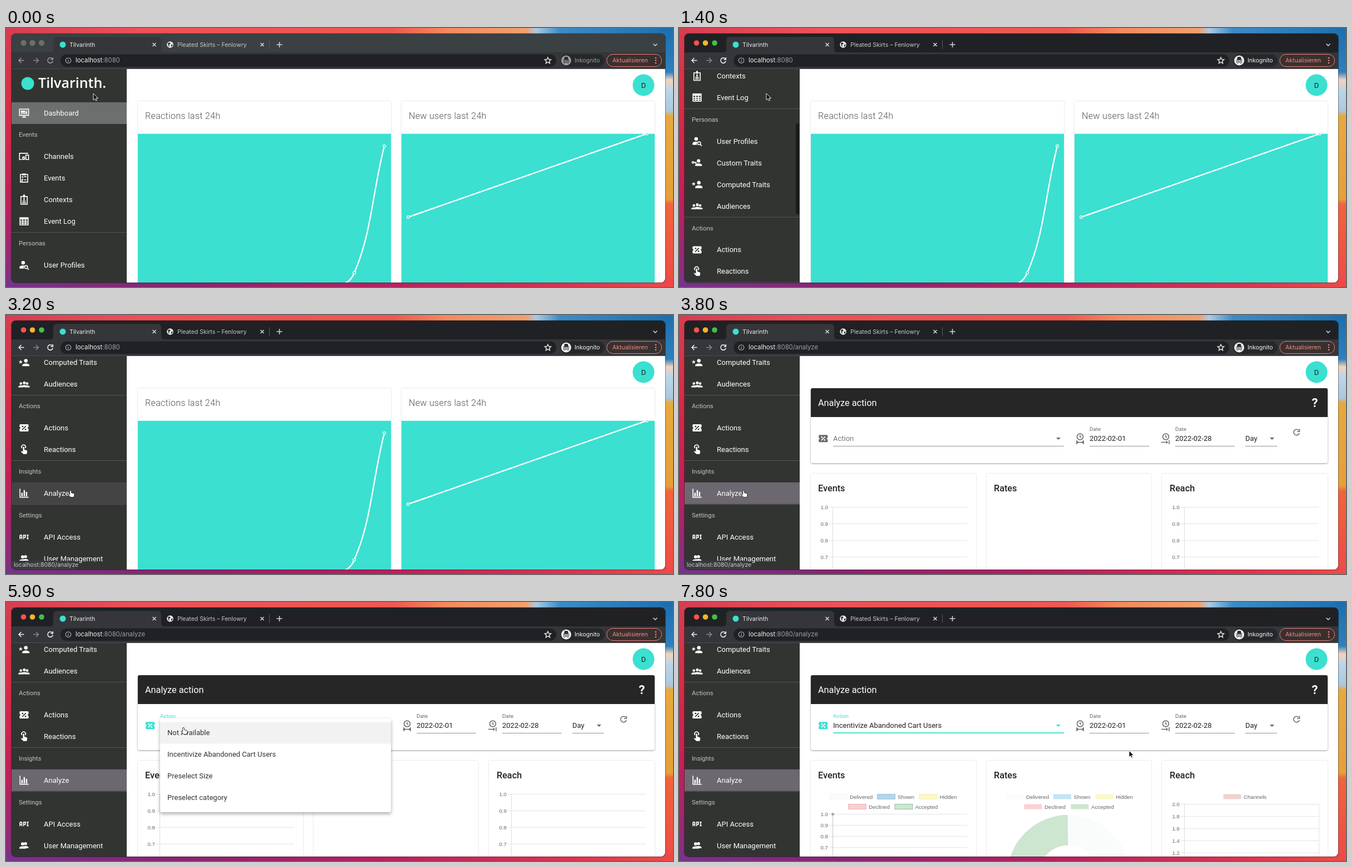
An HTML page that plays this animation: 1199x467 px, repeating every 8000 ms.

```html
<!DOCTYPE html>
<html lang="en">
<head>
<meta charset="utf-8">
<title>Dashboard walkthrough</title>
<style>
@property --scroll { syntax: "<number>"; inherits: true; initial-value: 0; }
@property --grow { syntax: "<number>"; inherits: true; initial-value: 0; }

html, body { margin: 0; width: 100%; height: 100%; overflow: hidden; }
svg { display: block; width: 100%; height: 100%; }
text { font: 13px Roboto, sans-serif; white-space: pre; }
.ui text { font: 10.5px Inter, sans-serif; }
.ui .url { font-size: 11.3px; }
.sub { font-size: 11.4px; fill: #c3c4c3; }
.head { font-size: 16.25px; }
.light { font-weight: 300; letter-spacing: .2px; fill: #555; }
.strong { font-weight: 500; fill: #222; }
.small { font-size: 9.75px; fill: #666; }
.chart text { font: 9.75px "Liberation Sans", Arial, sans-serif; fill: #666; }
.end { text-anchor: end; }
.mid { text-anchor: middle; }
.card { fill: #fff; filter: drop-shadow(0 .8px 1px #0003); }
.line { fill: none; stroke: currentColor; stroke-width: 1.5; }

/* every part shares one 8 s clock; 1% is 80 ms */
.t { animation: 8s linear infinite; }
.step { animation-timing-function: step-end; }

.bar { animation-name: bar; }
@keyframes bar { 0%, 1.25% { fill: #3b4042 } 2.5%, 100% { fill: #202124 } }
.ink { animation-name: ink; }
@keyframes ink { 0%, 1.25% { color: #9b9d9e } 2.5%, 100% { color: #f4f4f4 } }
.idle { animation-name: idle; }
@keyframes idle { 0%, 1.25% { opacity: 1 } 2.5%, 100% { opacity: 0 } }

.side { animation-name: scroll; }
@keyframes scroll {
  0%, 12.1% { --scroll: 0 } 13.75% { --scroll: 95 } 15% { --scroll: 150 }
  16.25% { --scroll: 192 } 17.5% { --scroll: 223 } 19% { --scroll: 243 }
  21.25%, 22.4% { --scroll: 252 } 23.75% { --scroll: 290 } 25% { --scroll: 338 }
  26.25% { --scroll: 380 } 27.5% { --scroll: 404 } 28.75% { --scroll: 416 }
  31%, 100% { --scroll: 419.6 }
}
#list { transform: translateY(calc(var(--scroll) * -1px)); }
.thumb { transform: translateY(calc(var(--scroll) * .43px)); animation-name: thumb; }
@keyframes thumb { 0%, 12% { opacity: 0 } 13%, 33.75% { opacity: 1 } 37%, 100% { opacity: 0 } }
.active { animation-name: active; }
@keyframes active { 0%, 37.5% { fill: #6d677000 } 39%, 43% { fill: #6d677050 } 45%, 100% { fill: #6d6770 } }
.status { animation-name: status; }
@keyframes status { 0%, 39% { opacity: 0 } 40%, 53.75% { opacity: 1 } 55.5%, 100% { opacity: 0 } }

.before { animation-name: before; }
@keyframes before { 0% { visibility: visible } 43.75%, 100% { visibility: hidden } }
.after { animation-name: after; }
@keyframes after { 0% { visibility: hidden } 43.75%, 100% { visibility: visible } }

.label { transform: translate(277px, 227px); animation-name: label; }
@keyframes label {
  0%, 63.25% { transform: translate(277px, 227px); fill: #757575; animation-timing-function: cubic-bezier(.25, .8, .5, 1) }
  67%, 100% { transform: translate(277px, 209.3px) scale(.75); fill: #3be0d0 }
}
.tint { animation-name: tint; }
@keyframes tint { 0%, 63.5% { color: #6a6a6a } 67%, 100% { color: #3be0d0 } }
.focus { transform-origin: 484.5px 236px; animation-name: focus; }
@keyframes focus {
  0%, 63.25% { transform: scaleX(0); fill: #111; animation-timing-function: cubic-bezier(.25, .8, .5, 1) }
  67%, 100% { transform: scaleX(1); fill: #3be0d0 }
}
.caret { transform-origin: 682px 223px; animation-name: caret; }
@keyframes caret {
  0%, 63.25% { transform: none; animation-timing-function: ease-out }
  67%, 83% { transform: rotate(180deg) } 86.5%, 100% { transform: rotate(0deg) }
}
.hoverline { animation-name: hoverline; }
@keyframes hoverline { 0%, 59% { fill: #949494 } 61%, 83% { fill: #222 } 87%, 100% { fill: #949494 } }
.value { animation-name: value; }
@keyframes value { 0%, 83% { opacity: 0 } 83.01%, 100% { opacity: 1 } }

.menu { animation-name: menu; animation-timing-function: cubic-bezier(.25, .8, .25, 1); }
@keyframes menu { 0%, 64.2% { opacity: 0 } 68%, 83.25% { opacity: 1 } 87%, 100% { opacity: 0 } }
.row1 { animation-name: row1; }
@keyframes row1 { 0%, 75.5% { opacity: 1 } 77%, 100% { opacity: 0 } }
.row2 { animation-name: row2; }
@keyframes row2 { 0%, 75.5% { opacity: 0 } 77%, 100% { opacity: 1 } }
.ripple { transform-origin: 355px 270px; animation-name: ripple; }
@keyframes ripple { 0%, 82% { transform: scale(0); opacity: 1 } 83.75% { transform: scale(1); opacity: 1 } 87%, 100% { transform: scale(1.3); opacity: 0 } }
.pick { animation-name: pick; }
@keyframes pick { 0%, 82.5% { fill: #333 } 83.5%, 100% { fill: #3be0d0 } }

.empty { animation-name: empty; }
@keyframes empty { 0% { visibility: hidden } 43.75% { visibility: visible } 86.25%, 100% { visibility: hidden } }
.filled { animation-name: filled; }
@keyframes filled { 0% { visibility: hidden } 86.25%, 100% { visibility: visible } }
.grow { animation-name: grow; }
@keyframes grow { 0%, 86.25% { --grow: 0; animation-timing-function: cubic-bezier(.165, .84, .44, 1) } 98.75%, 100% { --grow: 1 } }
.arc {
  fill: none; stroke-width: 55; transform-origin: 700px 493.5px; transform: rotate(-90deg);
  stroke-dasharray: calc(var(--grow) * 180px) 400px;
}
.second { transform: rotate(calc(var(--grow) * 180deg - 90deg)); }
.dot { transform: translateY(calc(203px - var(--grow) * 203px)); }

.cursor { animation-name: cursor; animation-timing-function: ease-in-out; }
@keyframes cursor {
  0%, 33.75% { transform: translate(157px, 118px) } 40%, 53.75% { transform: translate(116px, 316px) }
  61.25%, 73.75% { transform: translate(319px, 226px) } 80%, 85% { transform: translate(355px, 266px) }
  93.75%, 100% { transform: translate(809px, 268px) }
}
.arrow { animation-name: arrow; }
@keyframes arrow { 0% { opacity: 1 } 36% { opacity: 0 } 55.5% { opacity: 1 } 59% { opacity: 0 } 83% { opacity: 1 } 100% { opacity: 1 } }
.hand { animation-name: hand; }
@keyframes hand { 0% { opacity: 0 } 36% { opacity: 1 } 55.5% { opacity: 0 } 59% { opacity: 1 } 83% { opacity: 0 } 100% { opacity: 0 } }
</style>
</head>
<body>
<svg viewBox="0 0 1199 467">
<defs>
  <linearGradient id="sky">
    <stop offset="0" stop-color="#d63d50"/><stop offset=".2" stop-color="#ee5057"/>
    <stop offset=".58" stop-color="#f0584f"/><stop offset=".66" stop-color="#f48a5c"/>
    <stop offset=".78" stop-color="#f0a070"/><stop offset=".795" stop-color="#a9cbe4"/>
    <stop offset=".83" stop-color="#3d8cc6"/><stop offset="1" stop-color="#1c6fae"/>
  </linearGradient>
  <linearGradient id="west" x2="0" y2="1">
    <stop offset="0" stop-color="#d63d50"/><stop offset=".3" stop-color="#d92b45"/>
    <stop offset=".65" stop-color="#c21f58"/><stop offset="1" stop-color="#7b3285"/>
  </linearGradient>
  <linearGradient id="ground">
    <stop offset="0" stop-color="#78338a"/><stop offset=".25" stop-color="#8a2370"/>
    <stop offset=".55" stop-color="#b52060"/><stop offset=".85" stop-color="#e0324f"/><stop offset="1" stop-color="#ee4a48"/>
  </linearGradient>
  <linearGradient id="east" x2="0" y2="1">
    <stop offset="0" stop-color="#1c6fae"/><stop offset=".17" stop-color="#2f80bd"/>
    <stop offset=".2" stop-color="#f3d2bd"/><stop offset=".24" stop-color="#bcd6e8"/><stop offset=".32" stop-color="#a9c8e0"/>
    <stop offset=".34" stop-color="#e7a93f"/><stop offset=".66" stop-color="#e5a038"/>
    <stop offset=".68" stop-color="#f2643c"/><stop offset="1" stop-color="#ee4a48"/>
  </linearGradient>
  <clipPath id="win"><rect x="10" y="10" width="1175" height="449" rx="8"/></clipPath>
  <clipPath id="nav"><rect x="10" y="74" width="207" height="385"/></clipPath>
  <clipPath id="plots"><path d="M237 190.5H692V459H237ZM711 190.5H1166V459H711Z"/></clipPath>
  <clipPath id="option"><rect x="278" y="255.5" width="414" height="39"/></clipPath>
  <path id="person" d="M12 4a4 4 0 1 1 0 8 4 4 0 0 1 0-8M12 14c4.4 0 8 1.8 8 4v2H4v-2c0-2.2 3.6-4 8-4Z"/>
  <path id="ticket" fill-rule="evenodd" d="M4 4H20a2 2 0 0 1 2 2V10a2 2 0 0 0 0 4V18a2 2 0 0 1-2 2H4a2 2 0 0 1-2-2V14a2 2 0 0 0 0-4V6a2 2 0 0 1 2-2M15.5 7L7 15.500 8.500 17 17 8.500ZM8.800 7A1.800 1.800 0 1 0 8.810 7ZM15.200 13.400A1.800 1.800 0 1 0 15.210 13.400Z"/>
  <g id="clock" class="line"><circle cx="0" cy="-3" r="5.500"/><path d="M0-6V-3L2-1.500"/></g>
</defs>

<rect width="1199" height="467" fill="url(#sky)"/>
<rect y="10" width="600" height="457" fill="url(#west)"/>
<rect x="1180" width="19" height="467" fill="url(#east)"/>
<rect y="455" width="1199" height="12" fill="url(#ground)"/>
<rect x="9" y="9.500" width="1177" height="450.500" rx="8.500" fill="#0006"/>

<g clip-path="url(#win)">
  <g class="ui">
    <rect class="t bar" x="10" y="10" width="1175" height="40"/>
    <path d="M79 44Q85 44 85 38V23Q85 16 92 16H272Q279 16 279 23V38Q279 44 285 44H1185V74H10V44Z" fill="#35363a"/>
    <g><circle cx="31.500" cy="27" r="4.800" fill="#f9524a"/><circle cx="47.500" cy="27" r="4.800" fill="#f5b52e"/><circle cx="64" cy="27" r="4.800" fill="#3fc246"/></g>
    <g class="t idle" fill="#6c6e6f"><circle cx="31.500" cy="27" r="5"/><circle cx="47.500" cy="27" r="5"/><circle cx="64" cy="27" r="5"/></g>
    <circle cx="102" cy="30" r="5.500" fill="#3be0d0"/>
    <text x="114" y="33.800" fill="#eee">Tilvarinth</text>
    <text x="308" y="33.800" fill="#c6c8ca">Pleated Skirts – Fenlowry</text>
    <circle cx="295" cy="30" r="5.800" fill="#f1f1f1"/>
    <path d="M291 27L294 26 296 28 293 30.500 294 33.500 292 33ZM297 30L300 29.500 298.500 33 296.500 34Z" fill="#333"/>
    <g class="line" color="#d5d6d8" stroke-width="1.300"><path d="M263.500 27l6 6m0-6l-6 6M457.500 27l6 6m0-6l-6 6M486.500 30h10m-5-5v10M1163.500 28.500l3.500 3.500 3.500-3.500"/><path d="M473.500 22V38" stroke="#5a5c60" stroke-width="1"/></g>
    <rect x="98" y="47.500" width="891" height="22.500" rx="11.200" fill="#202124"/>
    <rect x="997" y="47.500" width="79" height="22.500" rx="11.200" fill="#26272a"/>
    <g class="t ink">
      <path class="line" d="M32.500 58.500H23m4.500-4.500L23 58.500l4.500 4.500M83.200 55.500A4.700 4.700 0 1 0 84.200 59.500M84.300 53v3.700H80.500"/>
      <circle cx="1007" cy="58.500" r="9" fill="currentColor"/>
      <path d="M1001 58h12M1003.500 57l1-4.500h5l1 4.500Z" stroke="#2b2c2f" fill="#2b2c2f"/>
      <g fill="none" stroke="#2b2c2f"><circle cx="1004" cy="61.500" r="1.800"/><circle cx="1010" cy="61.500" r="1.800"/><path d="M1006 61h2"/></g>
      <text x="1022" y="62.300" fill="currentColor">Inkognito</text>
    </g>
    <path class="line" color="#85878a" d="M49 58.500H58.500M54 54l4.500 4.500L54 63"/>
    <g class="line" color="#b5b8bb"><circle cx="112" cy="58.500" r="4.800" stroke-width="1.100"/><path d="M112 57.700V61.300M112 55.500V56.600" stroke-width="1.200"/></g>
    <text class="url" x="125" y="62.300" fill="#f1f1f1">localhost<tspan fill="#9aa0a6">:8080</tspan><tspan class="t step after" fill="#9aa0a6">/analyze</tspan></text>
    <path class="line" color="#e0e0e0" stroke-width="1.200" d="M974 53l1.600 3.600 4 .4-3 2.700.9 3.900-3.500-2.100-3.500 2.100.9-3.900-3-2.700 4-.4Z"/>
    <rect x="1080" y="47.500" width="98.500" height="22" rx="11" fill="#38302f" stroke="#ef8178"/>
    <text x="1090" y="62.300" fill="#f28b82">Aktualisieren</text>
    <g fill="#f28b82"><circle cx="1168" cy="54" r="1.300"/><circle cx="1168" cy="58.500" r="1.300"/><circle cx="1168" cy="63" r="1.300"/></g>
  </g>

  <rect x="217" y="74" width="968" height="385" fill="#fff"/>
  <rect x="10" y="73" width="1175" height="1" fill="#4a4c4e"/>

  <g class="t side" clip-path="url(#nav)">
    <rect x="10" y="74" width="207" height="385" fill="#323432"/>
    <g id="list" fill="#fff" color="#fff"></g>
    <rect class="t thumb" x="210" y="76" width="6" height="164" rx="3" fill="#191a19"/>
    <g class="t status ui">
      <path d="M10 443H121Q125 443 125 447V459H10Z" fill="#3a3b3e"/>
      <text x="14" y="454" fill="#c9cacc">localhost:8080/analyze</text>
    </g>
  </g>

  <circle cx="1146" cy="103" r="19.500" fill="#3be0d0"/>
  <text class="mid" x="1146" y="107.600" fill="#222">D</text>

  <g class="t step before">
    <rect class="card" x="237" y="132" width="455" height="340" rx="3"/>
    <rect class="card" x="711" y="132" width="455" height="340" rx="3"/>
    <text class="head light" x="250" y="164">Reactions last 24h</text>
    <text class="head light" x="724" y="164">New users last 24h</text>
    <g clip-path="url(#plots)">
      <rect x="237" y="190.500" width="929" height="270" fill="#3be0d0"/>
      <rect x="692" y="190" width="19" height="270" fill="#fff"/>
      <g fill="none" stroke="#fff" stroke-width="2.400">
        <path d="M604 462C617 459 623 449 626 441.500C657 371 658 300 680 213M723 341L1152 190.500"/>
        <g fill="#3be0d0" stroke-width="1.200"><circle cx="626" cy="441.500" r="2.400"/><circle cx="680" cy="213" r="2.400"/><circle cx="723" cy="341" r="2.400"/><circle cx="1152" cy="190.500" r="2.400"/></g>
      </g>
    </g>
  </g>

  <g class="t step after">
    <rect class="card" x="237" y="132" width="929" height="135" rx="3" style="filter:drop-shadow(0 1px 1.500px #0006)"/>
    <path d="M237 184V135Q237 132 240 132H1163Q1166 132 1166 135V184Z" fill="#262626"/>
    <text class="head" x="250" y="164" fill="#fff">Analyze action</text>
    <text class="mid" x="1143" y="166" fill="#fff" style="font-size:22px;font-weight:700">?</text>
    <rect class="card" x="237" y="286" width="297" height="190" rx="3"/>
    <rect class="card" x="553" y="286" width="296" height="190" rx="3"/>
    <rect class="card" x="868" y="286" width="298" height="190" rx="3"/>
    <text class="head strong" x="250" y="318">Events</text>
    <text class="head strong" x="566" y="318">Rates</text>
    <text class="head strong" x="882" y="318">Reach</text>

    <g class="t tint" fill="currentColor"><use href="#ticket" transform="translate(249.500 213) scale(.8125)"/></g>
    <rect class="t hoverline" x="277" y="236" width="415" height="1"/>
    <rect class="t focus" x="277" y="235.200" width="415" height="1.800"/>
    <text class="t label">Action</text>
    <text class="t value" x="277" y="227.300" fill="#222">Incentivize Abandoned Cart Users</text>
    <g class="t tint"><path class="t caret" d="M678 221h8l-4 4Z" fill="currentColor"/></g>

    <g color="#666">
      <use href="#clock" x="721" y="222.500"/><path class="line" d="M715 226v7m0-3.500h12m0-3.500v7M717 228l-1.500 1.500 1.500 1.500M725 228l1.500 1.500-1.500 1.500"/>
      <use href="#clock" x="875" y="222.500"/><path class="line" d="M867 229.500h11m-2-2l2 2-2 2M881 226v7"/>
      <path class="line" d="M1114 207.800A5.300 5.300 0 1 0 1115.200 213M1115.500 205.500v4.500H1111"/>
      <path d="M1062 221h8l-4 4Z" fill="currentColor"/>
    </g>
    <g fill="#949494"><rect x="738" y="236" width="107" height="1"/><rect x="892" y="236" width="107" height="1"/><rect x="1018" y="236" width="57" height="1"/></g>
    <text class="small" x="738" y="209.300">Date</text><text class="small" x="892" y="209.300">Date</text>
    <g fill="#222"><text x="738" y="227.300">2022-02-01</text><text x="892" y="227.300">2022-02-28</text><text x="1018" y="227.300">Day</text></g>

    <g class="t step empty chart" id="empty"></g>
    <g class="t step filled chart"><g class="t grow">
      <g id="filled"></g>
      <circle class="arc" cx="700" cy="493.500" r="82.200" pathLength="360" stroke="#fafcfb"/>
      <circle class="arc second" cx="700" cy="493.500" r="82.200" pathLength="360" stroke="#cde6cf"/>
      <circle class="dot" cx="276.500" cy="382" r="2.500" fill="#a5a9a6"/>
    </g></g>

    <g class="t menu">
      <rect x="277" y="210" width="415" height="169" rx="3" fill="#fff" style="filter:drop-shadow(0 3px 3px #0005)"/>
      <rect class="t row1" x="277" y="216.500" width="415" height="39" fill="#0000000d"/>
      <rect class="t row2" x="277" y="255.500" width="415" height="39" fill="#0000000d"/>
      <g clip-path="url(#option)"><circle class="t ripple" cx="355" cy="270" r="303" fill="#3be0d040"/></g>
      <g fill="#333">
        <text x="290" y="240.300">Not Available</text>
        <text class="t pick" x="290" y="279.300">Incentivize Abandoned Cart Users</text>
        <text x="290" y="318.300">Preselect Size</text>
        <text x="290" y="357.300">Preselect category</text>
      </g>
    </g>
  </g>
</g>

<g class="t cursor">
  <path class="t step arrow" d="M0 0V11.800L2.700 9.300 4.500 13.200 6.500 12.300 4.800 8.500H8.500Z" fill="#111" stroke="#fff" stroke-width=".9"/>
  <path class="t step hand" d="M-1.400 1Q0-.8 1.400 1V4.500L6 5.800Q7.200 6.300 7 8L6 12.500H-.2L-4 7.800Q-4.300 6.300-2.800 6.500L-1.400 7.700Z" fill="#fff" stroke="#222" stroke-width=".9"/>
</g>
</svg>

<script>
const byId = id => document.getElementById(id);
const stroke = d => `<path class="line" style="stroke-width:2" d="${d}"/>`;
const fill = d => `<path fill-rule="evenodd" d="${d}"/>`;
const person = (x = 0, y = 0, s = 1) => `<use href="#person" transform="translate(${x} ${y}) scale(${s})"/>`;

const icons = {
  Dashboard: stroke("M2 3H22V17H2ZM12 17V21M8 21H16") + fill("M5 6h9v5H5ZM15 6h4v2h-4ZM15 9h4v5h-4ZM5 12h4v2H5ZM10 12h4v2h-4Z"),
  Channels: stroke("M21 5H2V19H7M16 9H22V19H16ZM9.500 12V14M12.500 12V14M9.500 18V20M12.500 18V20") + '<circle class="line" style="stroke-width:2" cx="11" cy="16" r="2.300"/>',
  Events: stroke("M4 4H20V21H4ZM12 9H17M12 16H17M7 9H9V12M7 15H9L7 18H9") + fill("M8 2H16V6H8Z"),
  Contexts: stroke("M5 5H19V22H5ZM8 18.500H16") + fill("M10 1H14V7H10ZM12 8.500a2 2 0 1 1 0 4 2 2 0 0 1 0-4M8 16Q8 13.500 12 13.500T16 16Z"),
  "Event Log": fill("M2 3H22V21H2ZM4 8V11H8V8ZM10 8V11H14V8ZM16 8V11H20V8ZM4 13V15H8V13ZM10 13V15H14V13ZM16 13V15H20V13ZM4 17V19H8V17ZM10 17V19H14V17ZM16 17V19H20V17Z"),
  "User Profiles": fill("M10 3a4 4 0 1 1 0 8 4 4 0 0 1 0-8M10 13Q2 13 2 17V20H12Q10 16 13 13.300Z") + stroke("M19 19L22.500 22.500") + '<circle class="line" style="stroke-width:2" cx="16.500" cy="16.500" r="3.300"/>',
  "Custom Traits": person(4, 0, .95) + stroke("M5 11H10V14M8 11V13.500") + '<circle class="line" style="stroke-width:2" cx="3" cy="11" r="2"/>',
  "Computed Traits": person(4) + fill("M4.500 6L5.700 9.200H9L6.400 11.200 7.400 14.500 4.500 12.500 1.600 14.500 2.600 11.200 0 9.200H3.300Z"),
  Audiences: person(-3.500, 5, .7) + person(10.500, 5, .7) + person(3, 2.500, .8),
  Actions: '<use href="#ticket"/>',
  Reactions: stroke("M7.500 9A4.500 4.500 0 1 1 14.500 9") + fill("M9.500 6.500Q11 4.500 12.500 6.500V12L18 14Q19.500 15 19 17L18 22H10.500L5 16.500 6.500 15.200 9.500 16.800Z"),
  Analyze: fill("M2 2H4V20H22V22H2ZM6 11H9V19H6ZM11 5H14V19H11ZM16 9H19V19H16Z"),
  "API Access": stroke("M3 17V9Q3 8 4 8H6Q7 8 7 9V17M3 13H7M11 17V8H15V13H11M18 8H22M20 8V16M18 16H22"),
  "User Management": person(5, 1, .85) + person(-2, 1, .9)
};

const sections = [
  ["", "Dashboard"],
  ["Events", "Channels", "Events", "Contexts", "Event Log"],
  ["Personas", "User Profiles", "Custom Traits", "Computed Traits", "Audiences"],
  ["Actions", "Actions", "Reactions"],
  ["Insights", "Analyze"],
  ["Settings", "API Access", "User Management"]
];

function sidebar() {
  const row = 39;
  let y = 134;
  let out = `<circle cx="39" cy="100" r="11.500" fill="#3be0d0"/>
    <text x="58" y="108" style="font:600 25px 'Open Sans',sans-serif">Tilvarinth.</text>`;
  sections.forEach(([title, ...items], i) => {
    if (i > 1) {
      out += `<rect x="10" y="${y}" width="207" height=".9" fill="#585a58"/>`;
      y += .8;
    }
    if (title) {
      out += `<text class="sub" x="23" y="${y + 23.2}">${title}</text>`;
      y += row;
    }
    for (const name of items) {
      if (name === "Dashboard") out += `<rect x="10" y="${y}" width="207" height="${row}" fill="#6d6f6e"/>`;
      if (name === "Analyze") out += `<rect class="t active" x="10" y="${y}" width="207" height="${row}"/>`;
      out += `<g transform="translate(22.700 ${y + 9.8}) scale(.8125)">${icons[name]}</g>
        <text x="68" y="${y + 24}">${name}</text>`;
      y += row;
    }
  });
  return out;
}

// Horizontal grid with labels falling from the top value
function axis(x, top, gap, max, step) {
  let out = `<path d="M${x + .5} ${top}V459" stroke="#ddd"/>`;
  for (let i = 0; top + i * gap < 462; i++) {
    const y = top + i * gap;
    out += `<path d="M${x - 6} ${Math.floor(y) + .5}H${x + 242}" stroke="#e4e4e4"/>
      <text class="end" x="${x - 8}" y="${y + 3.5}">${(max - i * step).toFixed(1)}</text>`;
  }
  return out;
}

const key = (x, y, name, color, edge = "none") =>
  `<rect x="${x}" y="${y - 4.5}" width="32" height="9" fill="${color}" stroke="${edge}"/>
   <text x="${x + 36.5}" y="${y + 3.5}">${name}</text>`;

byId("list").innerHTML = sidebar();
byId("empty").innerHTML = axis(276, 346, 30.3, 1, .1) + axis(908, 346, 30.3, 1, .1);
byId("filled").innerHTML =
  axis(276, 382, 20.3, 1, .1) + axis(908, 364, 22, 2, .2) +
  '<path d="M276.500 382V459" stroke="#c4c6c5"/><path d="M1150.500 364V459" stroke="#e4e4e4"/>' +
  key(270.5, 351, "Delivered", "#fafcfb", "#f4f6f5") + key(356.500, 351, "Shown", "#b5d5ea", "#9cc3e0") +
  key(432, 351, "Hidden", "#f9f8c4", "#f3f1b4") + key(304.500, 369, "Declined", "#facfd0", "#efb5b8") +
  key(388, 369, "Accepted", "#cde6cf", "#93bd9b") +
  key(587.500, 351, "Delivered", "#fafcfb") + key(673, 351, "Shown", "#c1e4f6") +
  key(748.500, 351, "Hidden", "#f9f8c8") + key(620.500, 369, "Declined", "#fbd0d1") +
  key(704.500, 369, "Accepted", "#cde6cf") + key(978.500, 351, "Channels", "#eed2cd");
</script>
</body>
</html>
```
